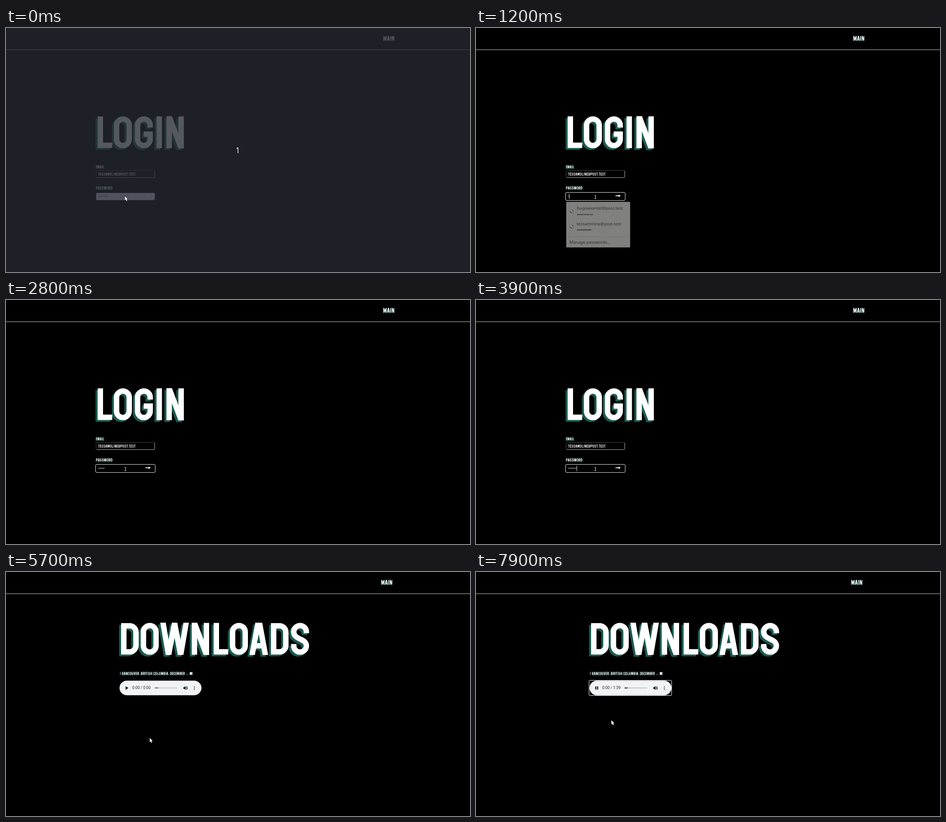
Animation of 1028x544 px, one loop 8000 ms. Source, as an HTML page with a canvas:

```html
<!DOCTYPE html>
<html lang="en">
<head>
<meta charset="utf-8">
<title>Login</title>
<style>
  html, body { margin: 0; width: 100%; height: 100%; overflow: hidden; background: #000; }
  canvas { display: block; }
</style>
</head>
<body>
<canvas id="stage" width="1028" height="544" aria-label="Login form, then a downloads page"></canvas>
<script>
const ctx = document.getElementById('stage').getContext('2d');
const LOOP = 8000, STEP = 100;
const TEAL = '#1b5a50';

// Display lettering: stroked skeletons, cap height 71.
const stem = 'M6.5 0V71', farStem = 'M33 0V71';
const over = 'a14 14 0 0 1 28 0', under = 'a14 14 0 0 1-28 0';
const back = 'a14 14 0 0 0-28 0v31a14 14 0 0 0 28 0';
const bowl = h => `h13a14 14 0 0 1 14 14v${h}a14 14 0 0 1-14 14h-13`;
const glyphs = {
  A: [42, 'M4.9 79L21-9 37.1 79M11 51H31'],
  B: [40, `${stem}M6.5 6.5${bowl(1)}M6.5 35.5${bowl(1)}`],
  C: [40, `M34 26v-6${back}v-6`],
  D: [40, `M6.5 6.5${bowl(30)}z`],
  E: [31, 'M31 6.5H6.5v58H31M6.5 35.5H28'],
  G: [42, `M35.5 25v-5${back}V39.5H21`],
  H: [39.5, `${stem}${farStem}M6.5 35.5H33`],
  I: [13, stem],
  L: [33, 'M6.5 0V64.5H33'],
  M: [48, `${stem}M41.5 0V71M5-6L24 55 43-6`],
  N: [39.5, `${stem}${farStem}M3.5-8L36 79`],
  O: [40, `M6 20${over}v31${under}z`],
  P: [40, `${stem}M6.5 6.5${bowl(5)}`],
  R: [40, `${stem}M6.5 6.5${bowl(5)}M20 36L34 79`],
  S: [42, `M35 23v-3a14 14 0 0 0-28 0c0 18 28 14 28 31${under}v-4`],
  T: [36, 'M0 6.5H36M18 0V71'],
  U: [39.5, 'M6.5 0v51a13 14 0 0 0 26.5 0V0'],
  V: [42, 'M4.9-8L21 80 37.1-8'],
  W: [64, 'M5.4-6L18.6 72 32 0 45.4 72 58.6-6'],
  '@': [50, 'M44 48V20a14 14 0 0 0-14-14H20a14 14 0 0 0-14 14v31a14 14 0 0 0 14 14H44M26 24V48H44'],
  '.': [13, 'M6.5 58V71'],
  ',': [13, 'M6.5 54V71']
};
for (const g of Object.values(glyphs)) g[1] = new Path2D(g[1]);

const leftBearing = c => 'BDEHILMNPRU'.includes(c) ? 4.5 : 'CGOS@.,'.includes(c) ? 2.5 : 0.5;
const rightBearing = c => 'HIMNU'.includes(c) ? 4.5 : 'CGOS@.,'.includes(c) ? 2.5 : 'BDPR'.includes(c) ? 1.5 : 1;

function letterRun(text, x, y, scale, color) {
  ctx.save();
  ctx.translate(x, y);
  ctx.scale(scale, scale);
  ctx.strokeStyle = color;
  ctx.lineWidth = scale < 1 ? 10.5 : 12;
  for (const c of text) {
    if (c === ' ') { ctx.translate(19, 0); continue; }
    const [width, path] = glyphs[c];
    ctx.translate(leftBearing(c), 0);
    ctx.save();
    ctx.beginPath();
    ctx.rect(-0.5, -0.5, width + 1, 72);
    ctx.clip();
    ctx.stroke(path);
    ctx.restore();
    ctx.translate(width + rightBearing(c), 0);
  }
  ctx.restore();
}

function lettering(text, x, y, scale, dx, dy) {
  letterRun(text, x + dx, y + dy, scale, TEAL);
  letterRun(text, x, y, scale, '#fff');
}
const heading = (text, x, y) => lettering(text, x, y, 1, -4.5, 4);
const label = (text, x, y) => lettering(text, x, y, 0.096, -1, 2);

function rect(x, y, w, h, color) {
  ctx.fillStyle = color;
  ctx.fillRect(x, y, w, h);
}

function box(x, y, w, h, r, fill, stroke, line = 1) {
  ctx.beginPath();
  ctx.roundRect(x, y, w, h, r);
  if (fill) { ctx.fillStyle = fill; ctx.fill(); }
  if (stroke) { ctx.strokeStyle = stroke; ctx.lineWidth = line; ctx.stroke(); }
}

function poly(points, color) {
  ctx.beginPath();
  for (let i = 0; i < points.length; i += 2) ctx.lineTo(points[i], points[i + 1]);
  ctx.closePath();
  ctx.fillStyle = color;
  ctx.fill();
}

function line(points, color, width) {
  ctx.beginPath();
  for (let i = 0; i < points.length; i += 2) ctx.lineTo(points[i], points[i + 1]);
  ctx.strokeStyle = color;
  ctx.lineWidth = width;
  ctx.stroke();
}

function disc(x, y, r, color) {
  ctx.beginPath();
  ctx.arc(x, y, r, 0, 7);
  ctx.fillStyle = color;
  ctx.fill();
}

function write(text, x, y, font, color) {
  ctx.font = font;
  ctx.fillStyle = color;
  ctx.fillText(text, x, y);
}

// Linear path through [time, x, y] keys.
const cursorKeys = [
  [0, 263.5, 375], [200, 263.5, 375], [300, 264.5, 377], [4200, 264.5, 377],
  [4600, 318.5, 370], [6000, 318.5, 370], [6600, 281, 279.5], [6800, 265, 257],
  [7600, 265, 257], [7900, 300, 330.5]
];
function cursorAt(t) {
  let i = 1;
  while (i < cursorKeys.length - 1 && cursorKeys[i][0] < t) i++;
  const [t0, x0, y0] = cursorKeys[i - 1], [t1, x1, y1] = cursorKeys[i];
  const k = Math.min(1, (t - t0) / (t1 - t0));
  return [x0 + (x1 - x0) * k, y0 + (y1 - y0) * k];
}

function pointer(x, y) {
  ctx.save();
  ctx.translate(x, y);
  ctx.beginPath();
  for (const [px, py] of [[0, 0], [0, 9.2], [2, 7.4], [3.5, 11], [5.1, 10.3], [3.6, 6.9], [6.3, 6.8]]) ctx.lineTo(px, py);
  ctx.closePath();
  ctx.lineJoin = 'round';
  ctx.strokeStyle = '#111';
  ctx.lineWidth = 1.4;
  ctx.stroke();
  ctx.fillStyle = '#fff';
  ctx.fill();
  ctx.restore();
}

function beam(x, y, color) {
  line([x, y - 3.5, x, y + 3.5], color, 1);
  for (const dy of [-3.5, 3.5]) line([x - 2, y + dy, x + 2, y + dy], color, 0.9);
}

function field(y, fill) {
  box(199.5, y + 0.5, 130, 16, 2, fill, '#444');
  ctx.beginPath();
  ctx.moveTo(201, y + 16.5);
  ctx.arcTo(329.5, y + 16.5, 329.5, y + 1, 2);
  ctx.lineTo(329.5, y + 1.5);
  ctx.strokeStyle = '#b4b4b4';
  ctx.lineWidth = 1;
  ctx.stroke();
}

function focusedField(fill) {
  box(198.5, 366.5, 132, 18, 2.5, '#000', '#e8e8e8');
  rect(200, 368, 129, 15, fill);
}

function arrowIcon(x, color) {
  rect(x, 373.2, 8, 1.7, color);
  poly([x + 7, 371.2, x + 11.3, 374, x + 7, 376.9], color);
}

function globe(x, y) {
  disc(x, y, 4, '#555');
  poly([x - 3, y - 1, x - 1, y - 3, x + 0.5, y - 1.5, x - 1, y], '#ddd');
  poly([x, y + 0.5, x + 2.6, y - 0.6, x + 1.6, y + 2.4], '#ddd');
}

function account(name, dots, y) {
  globe(212, y + 3.5);
  write(name, 223.3, y, '9.2px "Noto Sans", sans-serif', '#262626');
  for (let i = 0; i < dots; i++) disc(225.3 + i * 3.57, y + 10.6, 1.35, '#262626');
}

function passwordPopup(alpha) {
  ctx.save();
  ctx.globalAlpha = alpha;
  box(200, 387.5, 141.5, 101.7, 2, '#fffffc');
  ctx.globalAlpha = Math.min(1, alpha * 1.8);
  account('hugowvantel@post.test', 10, 405.4);
  account('tessamoline@post.test', 9, 439.6);
  rect(200, 465, 141.5, 0.8, 'rgba(90,90,90,.45)');
  write('Manage passwords…', 207, 481, '9.2px "Noto Sans", sans-serif', '#262626');
  ctx.restore();
}

const typedAt = [1200, 1300, 1700, 1700, 1900, 2100, 2200, 3700, 3900];

function passwordField(t) {
  const autofilled = t < 1200;
  const focused = t >= 400 && t < 4800;
  const selected = t >= 500 && autofilled;
  const fill = autofilled ? '#e8ebfa' : '#000';
  const ink = autofilled && !selected ? '#111' : '#fff';
  const count = autofilled ? 10 : typedAt.filter(at => at <= t).length;

  if (focused) focusedField(fill); else field(367, fill);
  if (selected) rect(204, 369.5, 21, 12, '#3c7be0');
  for (let i = 0; i < count; i++) rect(204.3 + i * 2.07, 374.4, 1.35, 1.35, ink);

  const caretOn = t >= 1200 && t < 2800 || t >= 3400 && t < 4400;
  if (caretOn) rect(204.2 + count * 2.07, 369.5, 0.9, 12, '#fff');

  const slide = Math.max(0, Math.min(1, (t - 4400) / 200));
  arrowIcon(309 + 7.3 * slide, '#fff');
}

function header(mainX) {
  rect(0, 48, 1028, 1, '#c4c4c4');
  lettering('MAIN', mainX, 17.6, 0.15, -1.2, 1.5);
}

function loginPage(t) {
  header(835.5);
  heading('LOGIN', 198, 197);
  label('EMAIL', 199, 306);
  field(317, '#000');
  letterRun('TESSAMOLINE@POST.TEST', 204, 322.2, 0.096, '#fff');
  label('PASSWORD', 199, 353);
  passwordField(t);
  const fade = t < 500 ? 0 : t < 1200 ? 1 : t < 1300 ? 0.5 : t < 1500 ? 0.06 : 0;
  if (fade) passwordPopup(fade);
}

function closeMark(x, y, color) {
  line([x - 2.6, y - 2.6, x + 2.6, y + 2.6], color, 2.3);
  line([x + 2.6, y - 2.6, x - 2.6, y + 2.6], color, 2.3);
}

function speaker(color) {
  poly([393, 256.8, 395, 256.8, 397.7, 254.2, 397.7, 263, 395, 260.4, 393, 260.4], color);
  for (const r of [2, 4]) {
    ctx.beginPath();
    ctx.arc(398, 258.6, r, -1.15, 1.15);
    ctx.strokeStyle = color;
    ctx.lineWidth = 1.1;
    ctx.stroke();
  }
}

function player(t) {
  const ink = '#0c0c0c';
  if (t >= 7000) box(250.5, 241.5, 183, 34, 2, null, '#fff');
  box(251.5, 242.3, 181.5, 32.5, 16.25, '#f1f3f4');
  if (t >= 7100) {
    rect(264.4, 255, 2.2, 7.2, ink);
    rect(268.2, 255, 2.2, 7.2, ink);
  } else {
    poly([265, 254.8, 271.2, 258.6, 265, 262.4], ink);
  }
  write(t < 5800 ? '0:00 / 0:00' : '0:00 / 1:39', 279.8, 261.4, '8.5px Roboto, sans-serif', '#222');
  box(329.5, 257.6, 49.5, 2, 1, '#c2c4c5');
  box(329.5, 257.6, 8, 2, 1, '#68696a');
  if (t >= 7400) box(329.5, 257.6, 3.5, 2, 1, ink);
  speaker(ink);
  for (const y of [255.4, 258.7, 262]) disc(417.3, y, 0.95, ink);
}

function downloadsPage(t) {
  header(830.9);
  heading('DOWNLOADS', 250, 113.5);
  label('I VANCOUVER, BRITISH COLUMBIA, DECEMBER ...', 252.7, 222.5);
  closeMark(409.2, 227.6, TEAL);
  closeMark(410.2, 226, '#fff');
  player(t);
}

function countdown() {
  rect(0, 0, 1028, 544, 'rgba(38,42,50,.78)');
  write('1', 508.5, 278.6, '17.5px "Noto Sans", sans-serif', '#eee');
}

function draw(t) {
  rect(0, 0, 1028, 544, '#000');
  if (t < 5700) loginPage(t); else downloadsPage(t);
  if (t < 300) countdown();

  const [x, y] = cursorAt(t);
  const overText = t >= 300 && t < 4600 && x < 308;
  if (overText) beam(x, y, t < 1200 ? '#222' : '#ddd');
  else pointer(x, y);
}

let shown = -1;
function frame() {
  const t = Math.floor(performance.now() % LOOP / STEP) * STEP;
  if (t !== shown) draw(shown = t);
  requestAnimationFrame(frame);
}
frame();
</script>
</body>
</html>
```
